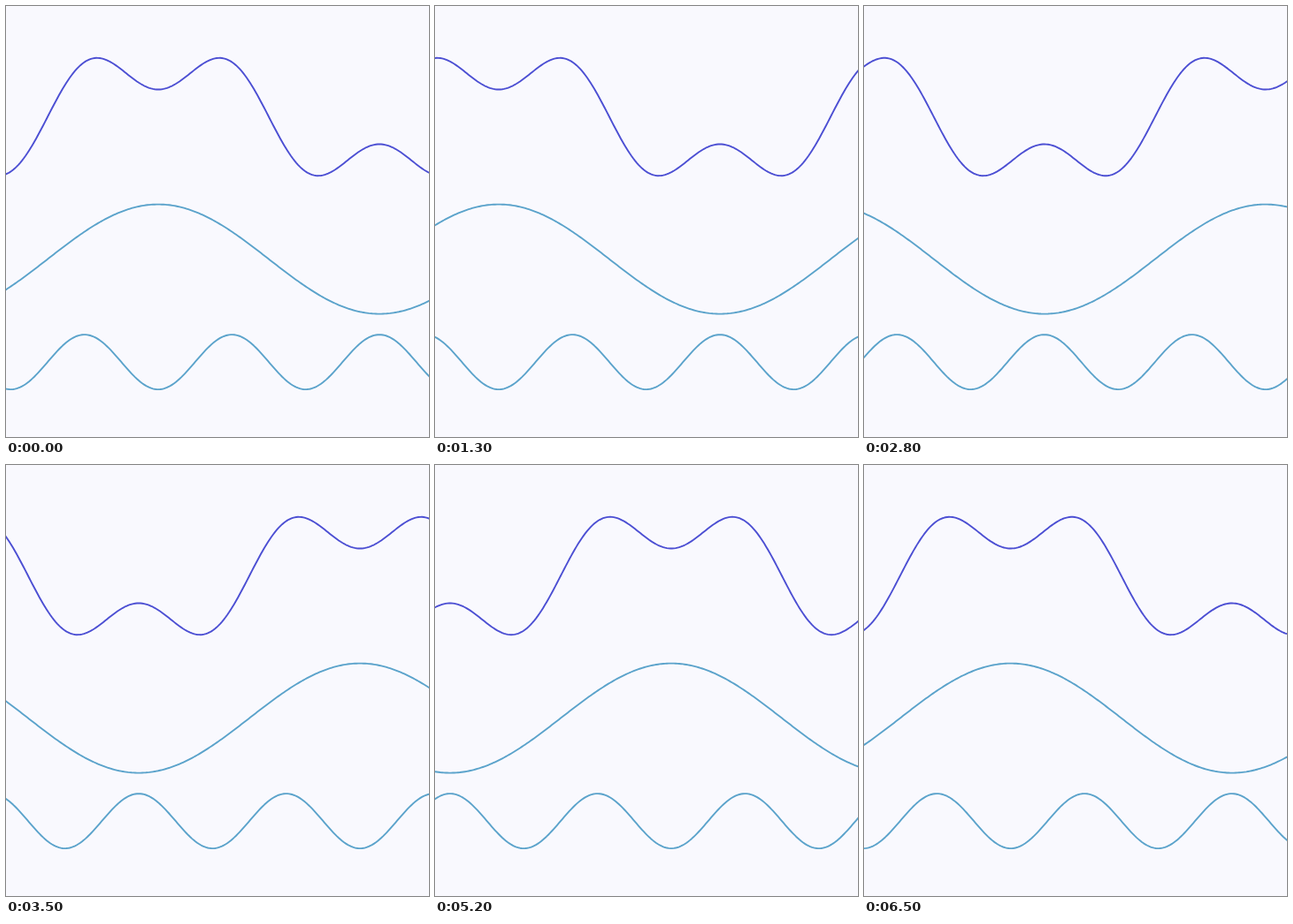
Recreate the animation shown at these times as an HTML page. Size 478 px wide and 488 px high, loop 6.6 s.

```html
<!DOCTYPE html>
<html lang="en">
<head>
<meta charset="utf-8">
<title>Sum of waves</title>
<style>
  html, body { margin: 0; width: 100%; height: 100%; overflow: hidden; background: #f9f9fe; }
  svg { display: block; width: 478px; height: 488px; }
  path { fill: none; stroke: #5ba3cb; stroke-width: 1.9; stroke-linejoin: round; }
  #sum { stroke: #4c4fd3; }
</style>
</head>
<body>
<svg viewBox="0 0 478 488">
  <path id="sum"/>
  <path id="slow"/>
  <path id="fast"/>
</svg>
<script>
const LOOP = 6600, TICK = 100;
const WIDTH = 478, WAVELENGTH = 500, CREST = 172, AMPLITUDE = 62;

// Distance scrolled to the left, as [ms, px]; the pace varies slightly.
const SCROLL = [[0, 0], [1300, 100], [2200, 172], [3500, 272], [4100, 320], [5200, 405], [6600, 514]];

const slow = a => AMPLITUDE * Math.cos(a);
const fast = a => -AMPLITUDE / 2 * Math.cos(3 * a);
const waves = [
  { id: 'sum', y: 125.5, height: a => slow(a) + fast(a) },
  { id: 'slow', y: 286.6, height: slow },
  { id: 'fast', y: 403.1, height: fast }
].map(wave => ({ ...wave, path: document.getElementById(wave.id) }));

function scrollAt(ms) {
  const i = SCROLL.findIndex(([end]) => ms < end);
  const [t0, x0] = SCROLL[i - 1], [t1, x1] = SCROLL[i];
  return x0 + (x1 - x0) * (ms - t0) / (t1 - t0);
}

function curve({ y, height }, crest) {
  const points = [];
  for (let x = -4; x <= WIDTH + 4; x += 2) {
    const angle = 2 * Math.PI * (x - crest) / WAVELENGTH;
    points.push(x + ' ' + (y - height(angle)).toFixed(2));
  }
  return 'M' + points.join('L');
}

function render(ms) {
  const time = Math.floor(ms % LOOP / TICK) * TICK;
  const crest = CREST - scrollAt(time);
  for (const wave of waves) wave.path.setAttribute('d', curve(wave, crest));
}

const start = performance.now();
function frame() {
  render(performance.now() - start);
  requestAnimationFrame(frame);
}
frame();
</script>
</body>
</html>
```
